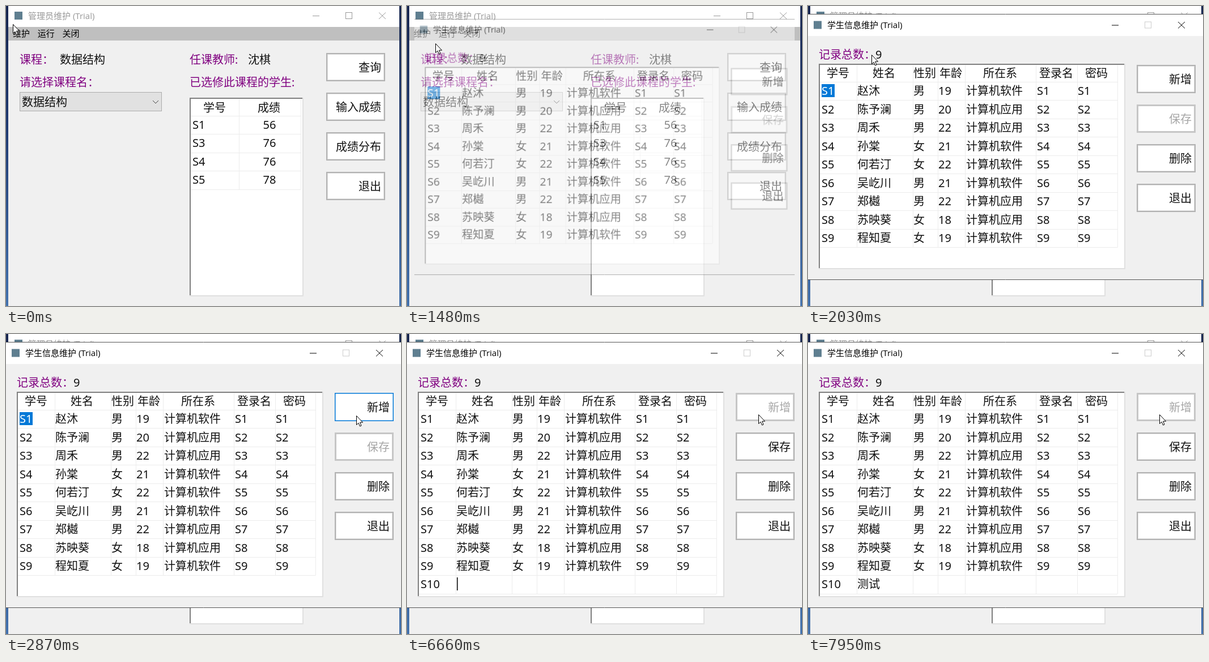
These frames come from a looping animation (697x530 px, 8 s). An HTML page with a canvas:

```html
<!DOCTYPE html>
<html lang="zh-CN">
<head>
<meta charset="utf-8">
<style>
html, body { margin: 0; width: 100%; height: 100%; overflow: hidden; }
canvas { display: block; }
</style>
</head>
<body>
<canvas id="stage" width="697" height="530"></canvas>
<script>
const LOOP = 8000, TICK = 92.4;
const stage = document.getElementById('stage');
const layer = document.createElement('canvas');
layer.width = 697;
layer.height = 530;
const screen = stage.getContext('2d'), dialogCtx = layer.getContext('2d');
let c = screen;

const CJK = '"Noto Sans CJK SC", "Noto Sans CJK JP", sans-serif';
const BODY = `20px "Noto Sans", ${CJK}`;
const UI = `15px "Open Sans", ${CJK}`;
const SMALL = `14px "Open Sans", ${CJK}`;
const PURPLE = '#800080', BLUE = '#0078d7', FACE = '#f0f0f0';

const students = [
  ['赵沐', '男', 19, '软件'], ['陈予澜', '男', 20, '应用'], ['周禾', '男', 22, '应用'],
  ['孙棠', '女', 21, '软件'], ['何若汀', '女', 22, '软件'], ['吴屹川', '男', 21, '软件'],
  ['郑樾', '男', 22, '应用'], ['苏映葵', '女', 18, '应用'], ['程知夏', '女', 19, '软件']
];
const scores = [['S1', 56], ['S3', 76], ['S4', 76], ['S5', 78]];

// Pointer stops: tick, x, y
const pointerPath = [
  [0, 12, 32], [1, 82, 157], [2, 82, 157], [6, 26, 48], [8, 30, 49], [10, 45, 61],
  [12, 50, 65], [14, 50, 66], [20, 50, 66], [21, 46, 67], [29, 570, 217],
  [30, 606, 168], [31, 618, 144], [34, 620, 141], [39, 620, 141], [40, 620, 142]
];

function rect(x, y, w, h, fill) {
  c.fillStyle = fill;
  c.fillRect(x, y, w, h);
}

function frame(x, y, w, h, color, width = 1) {
  c.strokeStyle = color;
  c.lineWidth = width;
  c.strokeRect(x + width / 2, y + width / 2, w - width, h - width);
}

function line(color, ...points) {
  c.strokeStyle = color;
  c.lineWidth = 1;
  c.beginPath();
  for (let i = 0; i < points.length; i += 2) c.lineTo(points[i], points[i + 1]);
  c.stroke();
}

function text(s, x, y, color = '#111', font = BODY, align = 'left') {
  c.font = font;
  c.textAlign = align;
  c.fillStyle = color;
  c.fillText(s, x, y);
}

function textWidth(s) {
  c.font = BODY;
  return c.measureText(s).width;
}

function titleBar(title, x, y, color, maxColor) {
  rect(x, y - 7, 14, 14, '#5f7f90');
  text(title, x + 24, y + 5.5, color, UI);
  line(color, x + 526, y + .5, x + 538, y + .5);
  frame(x + 584, y - 6, 12, 12, maxColor);
  line(color, x + 643, y - 5.5, x + 655, y + 6);
  line(color, x + 655, y - 5.5, x + 643, y + 6);
}

function sunken(x, y, w, h) {
  rect(x, y, w, h, '#fff');
  rect(x, y, w, 2, '#808080');
  rect(x, y, 2, h, '#808080');
  rect(x + w - 2, y, 2, h, '#e0e0e0');
  rect(x, y + h - 2, w, 2, '#e0e0e0');
}

function button(label, x, y, state) {
  rect(x, y, 104, 50, '#fff');
  if (state === 'disabled') frame(x, y, 104, 50, '#c6c6c6', 3);
  else if (state === 'hover') frame(x, y, 104, 50, BLUE, 1.5);
  else {
    frame(x + 2, y + 2, 100, 46, '#e0e0e0');
    frame(x, y, 104, 50, state === 'focus' ? BLUE : '#b2b2b2', 2);
  }
  if (state === 'focus') {
    c.setLineDash([1, 1]);
    frame(x + 3, y + 3, 98, 44, '#000');
    c.setLineDash([]);
  }
  text(label, x + 97, y + 33, state === 'disabled' ? '#a6a6a6' : '#111', BODY, 'right');
}

function grid(left, top, columns, rows) {
  const right = columns[columns.length - 1], bottom = top + rows * 32.5;
  columns.forEach(x => line('#ececec', x + .5, top - 30, x + .5, bottom));
  for (let i = 0; i <= rows; i++) {
    const y = Math.floor(top + i * 32.5) + .5;
    line('#ececec', left, y, right, y);
  }
}

function menu() {
  rect(4, 38, 44, 23, '#92b2d0');
  frame(4, 38, 44, 23, '#4a9be0');
  text('维护', 12, 54, '#000', UI);
  c.save();
  c.shadowColor = 'rgba(0,0,0,.55)';
  c.shadowBlur = 5;
  c.shadowOffsetX = c.shadowOffsetY = 3;
  rect(4, 61, 183, 96, '#bfbfbf');
  c.restore();
  frame(4, 61, 183, 96, '#999');
  frame(5, 62, 181, 94, '#f4f4f4', 2);
  [['学生表', 'S'], ['教师表', 'T'], ['课程表', 'C']].forEach(([name, key], i) => {
    text(name, 57, 83 + i * 30, '#000', UI);
    text('Ctrl+' + key, 121, 83 + i * 30, '#333', SMALL);
  });
}

function mainWindow(k) {
  const active = k >= 5 && k < 14, color = active ? '#000' : '#999';
  const desktop = c.createLinearGradient(0, 0, 0, 530);
  desktop.addColorStop(0, '#17264f');
  desktop.addColorStop(.4, '#1f3a70');
  desktop.addColorStop(1, '#4272ae');
  rect(0, 0, 697, 530, desktop);
  rect(4, 0, 690, 530, FACE);
  rect(4, 0, 690, 37, '#fff');
  titleBar('管理员维护 (Trial)', 15, 17, color, color);
  rect(4, 37, 690, 24, '#bfbfbf');
  ['维护', '运行', '关闭'].forEach((s, i) => text(s, 12 + i * 43.7, 54, '#000', UI));

  text('课程：', 24, 102, PURPLE);
  text('数据结构', 95, 102);
  text('请选择课程名：', 24, 142, PURPLE);
  text('任课教师:', 324, 102, PURPLE);
  text('沈棋', 427, 102);
  text('已选修此课程的学生:', 324, 142, PURPLE);

  rect(24, 152, 251, 34, '#e1e1e1');
  frame(24, 152, 251, 34, '#adadad');
  text('数据结构', 28, 177);
  line('#444', 259, 167, 264, 172, 269, 167);

  sunken(324, 162, 201, 351);
  grid(326, 194, [411, 520], 4);
  text('学号', 348, 187);
  text('成绩', 444, 187);
  scores.forEach(([id, score], i) => {
    text(id, 329, 217 + i * 32.4);
    text(score, 465, 217 + i * 32.4, '#111', BODY, 'center');
  });

  ['查询', '输入成绩', '成绩分布', '退出'].forEach((s, i) =>
    button(s, 565, 83 + i * 70, active && i === 2 ? 'focus' : ''));
  if (active && k >= 7 && k < 11) menu();
}

function caret(x) {
  rect(Math.round(x), 430, 1.5, 23, '#000');
}

function newRow(k) {
  const id = 'S10'.slice(0, k < 48 ? 0 : k < 57 ? 1 : k < 59 ? 2 : 3);
  text(id, 24, 449);
  if (k >= 81) text('测试', 87, 449);
  else if (k >= 74) {
    const typed = 'ceshi'.slice(0, k < 76 ? 1 : k - 74 - (k < 78 ? k - 76 : 2));
    const pinyin = k < 76 ? 'c' : k < 78 ? 'ce' : 'ceshi'.slice(0, k - 75);
    text(pinyin, 87, 449);
    const end = 88 + textWidth(pinyin);
    c.setLineDash([2, 1]);
    line('#333', 87, 453.5, end, 453.5);
    c.setLineDash([]);
    caret(end);
  }
  const blinkOff = (k >= 40 && k < 46) || (k >= 54 && k < 57) || (k >= 67 && k < 72) || k >= 86;
  if (blinkOff || (k >= 74 && k < 81)) return;
  caret(k < 61 ? 24 + textWidth(id) : k < 81 ? 88 : 128);
}

function candidates(k) {
  const wide = k >= 76, width = wide ? 609 : 580;
  rect(86, 462, width, 51, '#fff');
  frame(86, 462, width, 51, '#bdbdbd');
  const words = !wide ? '从 才 次 出 成 称 长' : k < 78 ? '册 侧 策 测 厕 恻 测试' : '测试 侧室 侧视 策士 测 侧 策';
  words.split(' ').forEach((word, i) =>
    text(`${i + 1} ${word}`, 100 + i * 80, 495, i ? '#222' : BLUE));
}

function dialog(k) {
  const adding = k >= 34;
  rect(0, 14, 697, 470, FACE);
  rect(0, 15, 697, 38, '#fff');
  titleBar('学生信息维护 (Trial)', 10, 33.5, '#000', '#ccc');
  line('#555', 0, 14.5, 697, 14.5);
  line('#555', 0, 483.5, 697, 483.5);
  text('记录总数：', 19, 93, PURPLE);
  text('9', 119, 93);

  sunken(19, 102, 541, 363);
  grid(21, 134, [86, 185, 229, 277, 402, 475, 546], adding ? 10 : 9);
  const starts = [33, 114, 186, 232, 309, 408, 489];
  '学号 姓名 性别 年龄 所在系 登录名 密码'.split(' ').forEach((s, i) => text(s, starts[i], 126));
  if (!adding) rect(24, 138, 23, 23, BLUE);
  students.forEach(([name, sex, age, field], i) => {
    const y = 157 + i * 32.5, id = 'S' + (i + 1);
    text(id, 24, y, i || adding ? '#111' : '#fff');
    text(name, 87, y);
    text(sex, 186, y);
    text(age, 230, y);
    text('计算机' + field, 279, y);
    text(id, 404, y);
    text(id, 476, y);
  });
  if (adding) newRow(k);

  const states = adding ? ['disabled'] : [k >= 30 ? 'hover' : '', 'disabled'];
  ['新增', '保存', '删除', '退出'].forEach((s, i) => button(s, 580, 104 + i * 70, states[i]));
}

function pointer(k) {
  if (k === 11 || (k >= 48 && k < 61) || (k >= 78 && k < 81)) return;
  const next = pointerPath.findIndex(p => p[0] > k);
  const b = next < 0 ? pointerPath[pointerPath.length - 1] : pointerPath[next];
  const a = next < 0 ? b : pointerPath[next - 1];
  const u = a === b ? 0 : (k - a[0]) / (b[0] - a[0]);
  const x = Math.round(a[1] + (b[1] - a[1]) * u), y = Math.round(a[2] + (b[2] - a[2]) * u);
  const arrow = new Path2D('M.5 .5V16.5L4 13.2L6.5 19L9 18L6.6 12.2H11.5Z');
  c.save();
  c.translate(x, y);
  c.fillStyle = '#fff';
  c.fill(arrow);
  c.strokeStyle = '#000';
  c.lineWidth = 1;
  c.stroke(arrow);
  c.restore();
}

function draw(now) {
  const k = Math.floor((now % LOOP + 8) / TICK);
  c = screen;
  mainWindow(k);
  if (k >= 14) {
    c = dialogCtx;
    c.clearRect(0, 0, 697, 530);
    dialog(k);
    c = screen;
    const p = Math.min(1, (k - 13) / 6), scale = 1 - .15 * (1 - p) ** 2;
    c.save();
    c.globalAlpha = p;
    c.translate(348.5, 249);
    c.scale(scale, scale);
    c.drawImage(layer, -348.5, -249);
    c.restore();
  }
  if (k >= 74 && k < 81) candidates(k);
  pointer(k);
}

const start = performance.now();
function tick() {
  draw(performance.now() - start);
  requestAnimationFrame(tick);
}
tick();
</script>
</body>
</html>
```
